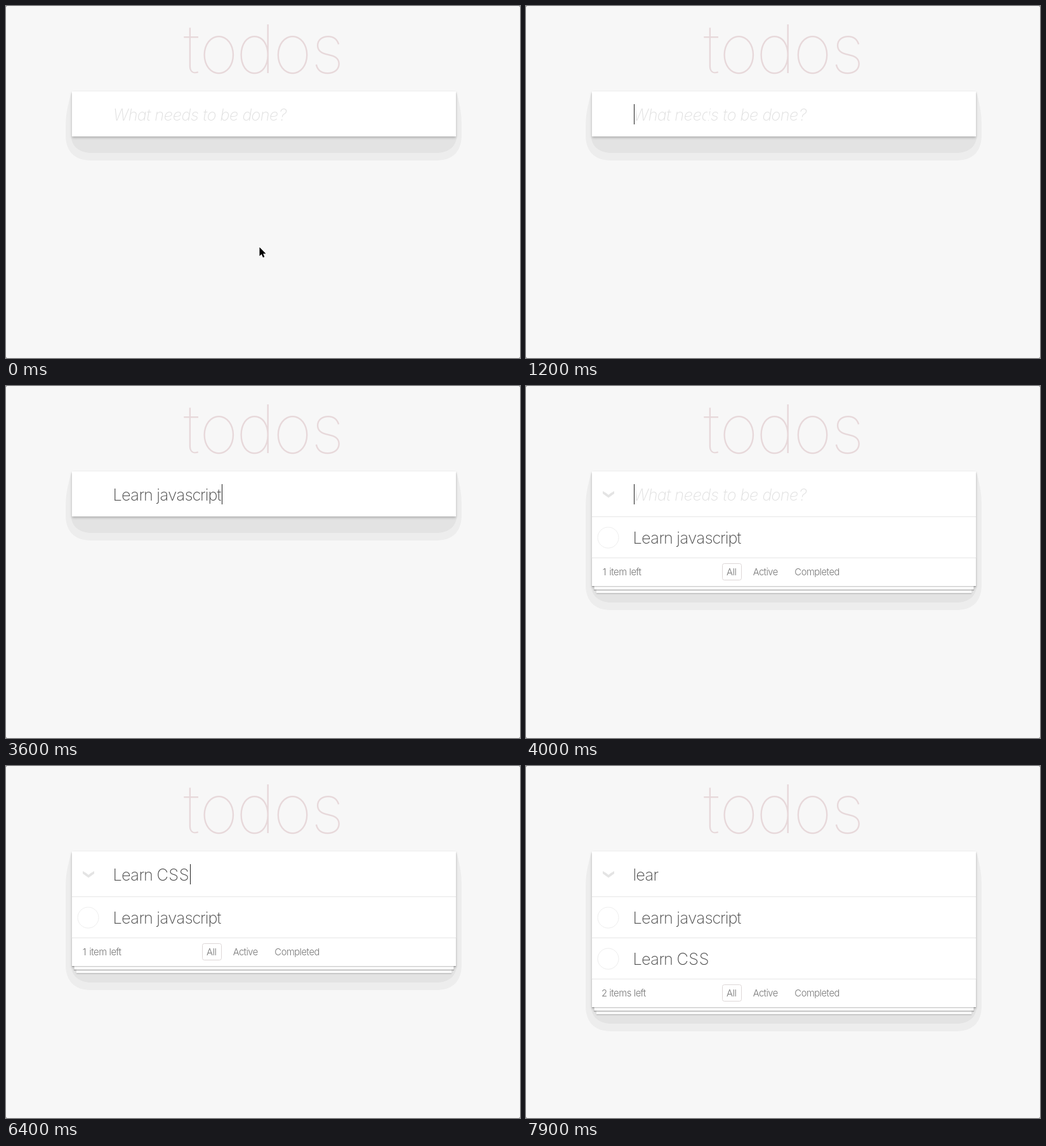
An HTML page that plays this animation: 810x556 px, repeating every 8 s.

```html
<!DOCTYPE html>
<html lang="en">
<head>
<meta charset="utf-8">
<title>todos</title>
<style>
  html, body { margin: 0; width: 100%; height: 100%; overflow: hidden; background: #666; }
  #stage { position: relative; width: 810px; height: 556px; overflow: hidden; border-radius: 2px; background: #f7f7f7; }
  svg { position: absolute; left: 0; top: 0; }
  #card {
    position: absolute; left: 104px; top: 135px; width: 605px;
    background: #fff; box-shadow: 0 2px 4px rgba(0, 0, 0, .24);
  }
  #stack {
    position: absolute; left: 0; right: 0; bottom: 0; height: 45px;
    box-shadow: 0 1px 1px rgba(0, 0, 0, .2),
      0 8.8px 0 -3.3px #fafafa, 0 9.9px 1px -3.3px rgba(0, 0, 0, .25),
      0 17.6px 0 -6.6px #fafafa, 0 18.7px 2px -6.6px rgba(0, 0, 0, .25);
  }
  text { font-family: Inter, Roboto, "Liberation Sans", sans-serif; font-optical-sizing: none; text-anchor: middle; white-space: pre; }
  .title { font-weight: 100; fill: #e7d8da; }
  .entry { font-weight: 250; fill: #484848; }
  .hint { font-weight: 200; font-style: italic; fill: #e0e0e0; }
  .small { font-weight: 300; fill: #777; }
  .line { fill: #e6e6e6; }
  .ring { fill: none; stroke: #ededed; }
</style>
</head>
<body>
<div id="stage">
  <svg width="810" height="556">
    <path id="outer" fill="#ededed"/>
    <path id="inner" fill="#e3e3e3"/>
  </svg>
  <div id="card"><div id="stack"></div></div>
  <svg id="front" width="810" height="556">
    <g id="list">
      <path fill="#e4e4e4" d="M121 166Q126 168.5 130 172Q134 168.5 139 166V170L130 176.5L121 170Z"/>
      <rect class="line" x="104" y="206" width="605" height="1"/>
      <circle class="ring" cx="129.5" cy="239.5" r="16.5"/>
      <g id="second">
        <rect class="line" x="104" y="271" width="605" height="1"/>
        <circle class="ring" cx="129.5" cy="304.5" r="16.5"/>
      </g>
      <g id="foot">
        <rect class="line" x="104" y="271" width="605" height="1"/>
        <rect x="309.5" y="280.5" width="30" height="26" rx="3" fill="none" stroke="#ddd7d7"/>
      </g>
    </g>
    <rect id="caret" y="155" width="1" height="32" fill="#222"/>
    <path id="arrow" d="M0 0V14L3.2 11.1L5.5 16.3L7.9 15.3L5.7 10.2H10Z"
      fill="#000" stroke="#fff" paint-order="stroke" stroke-width="1.6"/>
    <g id="beam" fill="none">
      <path id="beamShape" stroke="#fff" stroke-width="2.6"
        d="M-4 -7.5Q-1 -7.5 0 -6Q1 -7.5 4 -7.5M0 -6V6M-4 7.5Q-1 7.5 0 6Q1 7.5 4 7.5M-2 2.5H2"/>
      <use href="#beamShape" style="stroke:#000;stroke-width:1.2"/>
    </g>
  </svg>
</div>
<script>
const $ = id => document.getElementById(id);
const LOOP = 8000, LEFT = 168.8;
const ENTRY = { cls: 'entry', size: 26.4, track: 1 };
const HINT = { cls: 'hint', size: 26.4, track: .6 };
const SMALL = { cls: 'small', size: 15.4, track: .43 };
const TITLE = { cls: 'title', size: 110, track: 3 };

// Letters sit on a Helvetica-like rhythm, tightened by the style's tracking.
const ruler = document.createElement('canvas').getContext('2d');
ruler.font = '100px "Liberation Sans", Arial, sans-serif';
const advance = (ch, s) => ruler.measureText(ch).width * s.size / 100 - s.track;
const widthOf = (str, s) => [...str].reduce((sum, ch) => sum + advance(ch, s), 0);

function setText(el, str, x, style) {
  const centres = [...str].map(ch => {
    const w = advance(ch, style);
    x += w;
    return (x - w / 2).toFixed(2);
  });
  el.setAttribute('x', centres.join(' '));
  el.textContent = str;
}

function label(parent, str, x, y, style) {
  const el = document.createElementNS('http://www.w3.org/2000/svg', 'text');
  el.setAttribute('class', style.cls);
  el.setAttribute('font-size', style.size * .96);
  el.setAttribute('y', y);
  setText(el, str, x, style);
  parent.insertBefore(el, parent === $('front') ? $('caret') : null);
  return el;
}

label($('front'), 'todos', 278.7, 105.5, TITLE);
const hint = label($('front'), 'What needs to be done?', LEFT, 181, HINT);
const typed = label($('front'), '', LEFT, 181, ENTRY);
label($('list'), 'Learn javascript', LEFT, 249, ENTRY);
label($('second'), 'Learn CSS', LEFT, 314, ENTRY);
const count = label($('foot'), '', 119.5, 299, SMALL);
label($('foot'), 'All', 316, 299, SMALL);
label($('foot'), 'Active', 357.7, 299, SMALL);
label($('foot'), 'Completed', 423.3, 299, SMALL);

// [time, typed text, caret shown]
const typing = [
  [0, '', 0], [1000, '', 1], [1700, '', 0],
  [1900, 'L', 1], [2000, 'Le', 1], [2100, 'Lea', 1], [2200, 'Lear', 1],
  [2300, 'Learn', 1], [2400, 'Learn ', 1], [2500, 'Learn j', 1],
  [2700, 'Learn ja', 1], [2800, 'Learn java', 1], [3100, 'Learn javas', 1],
  [3300, 'Learn javasc', 1], [3400, 'Learn javascr', 1],
  [3500, 'Learn javascrip', 1], [3600, 'Learn javascript', 1],
  [4000, '', 1], [4400, 'L', 1], [4500, 'Le', 1], [4600, 'Lea', 1],
  [4700, 'Learn', 1], [4800, 'Learn ', 1], [5300, 'Learn ', 0], [5800, 'Learn ', 1],
  [6100, 'Learn C', 1], [6300, 'Learn CS', 1], [6400, 'Learn CSS', 1],
  [6800, '', 1], [7200, 'le', 1], [7400, 'lear', 1], [7900, 'lear', 0]
];
// [time, pointer, x, y]
const pointer = [
  [0, 'arrow', 399.5, 381], [100, 'arrow', 390, 330], [200, 'arrow', 375, 250],
  [300, 'beam', 364.5, 175], [500, 'beam', 349, 155], [600, 'beam', 311.5, 166],
  [700, 'beam', 335, 181], [1000, 'beam', 318, 176], [1100, 'beam', 296, 173],
  [1200, 'beam', 287.5, 172], [1900, '', 0, 0]
];
// [time, number of items, card height]
const cards = [[0, 0, 71], [4000, 1, 181], [6800, 2, 246]];

const at = (steps, t) => steps.findLast(s => s[0] <= t);
const show = (el, on) => { el.style.display = on ? '' : 'none'; };

function drawTyping([, str, caretOn]) {
  setText(typed, str, LEFT, ENTRY);
  show(hint, !str);
  show($('caret'), caretOn);
  $('caret').setAttribute('x', Math.round(LEFT + widthOf(str, ENTRY) + .7));
}

function drawPointer([, kind, x, y]) {
  for (const id of ['arrow', 'beam']) {
    show($(id), id === kind);
    $(id).setAttribute('transform', `translate(${x} ${y})`);
  }
}

function drawCard([, items, height]) {
  const b = 135 + height;
  $('card').style.height = height + 'px';
  show($('stack'), items);
  show($('list'), items);
  show($('second'), items > 1);
  $('foot').setAttribute('transform', `translate(0 ${items > 1 ? 65 : 0})`);
  setText(count, items > 1 ? '2 items left' : '1 item left', 119.5, SMALL);
  $('outer').setAttribute('d', `M103 137C97 158 94 172 94 190V${b}C95 ${b + 24} 108 ${b + 38} 134 ${b + 38}
    H678C704 ${b + 38} 717 ${b + 24} 718 ${b}V190C718 172 716 158 710 137Z`);
  $('inner').setAttribute('d', `M103 ${b}C103 ${b + 16} 116 ${b + 26} 135 ${b + 26}
    H678C697 ${b + 26} 710 ${b + 16} 710 ${b}Z`);
}

const tracks = [[typing, drawTyping], [pointer, drawPointer], [cards, drawCard]]
  .map(([steps, draw]) => ({ steps, draw, last: null }));
const start = performance.now();

function tick() {
  const t = (performance.now() - start) % LOOP;
  for (const track of tracks) {
    const step = at(track.steps, t);
    if (step !== track.last) track.draw(track.last = step);
  }
  requestAnimationFrame(tick);
}
tick();
</script>
</body>
</html>
```
